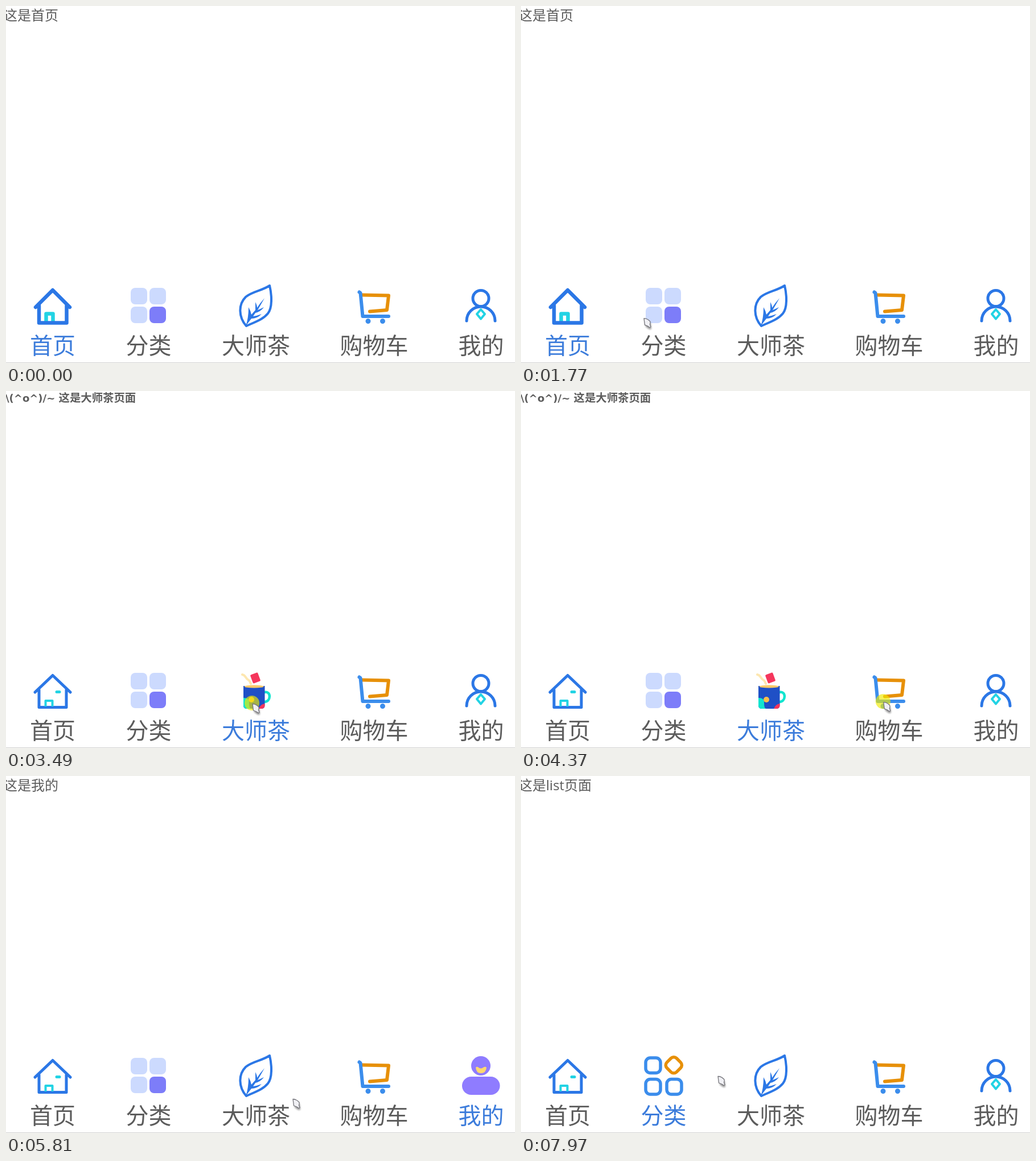
Animation, 894 px wide and 627 px high, one loop 8 s. Source, as an HTML page:

```html
<!DOCTYPE html>
<html lang="zh-CN">
<head>
<meta charset="utf-8">
<title>Tab bar</title>
<style>
  html, body { margin: 0; width: 100%; height: 100%; overflow: hidden; background: #fff; }
  svg { display: block; width: 894px; height: 627px; }
  text { font-family: "Open Sans", "Noto Sans CJK SC", "Noto Sans CJK", sans-serif; fill: #5c5c5c; }
  .label { font-size: 40px; text-anchor: middle; }
  .title { font-size: 24px; }
  .bold { font-weight: 700; font-size: 19.4px; }
  .bold .face { font-family: "DejaVu Sans", sans-serif; font-size: 18px; }
  .title, .on { visibility: hidden; }
  .title.show, .tab.active .on { visibility: visible; }
  .tab.active .off { visibility: hidden; }
  .tab.active .label { fill: #3c7cdb; }
  .line { fill: none; stroke-linecap: round; stroke-linejoin: round; }
  .blue { stroke: #2b77e6; }
  .sky { stroke: #3b8dec; }
  .orange { stroke: #e79008; }
  .cyan { stroke: #22d3e4; }
  .butt { stroke-linecap: butt; }
</style>
</head>
<body>
<svg viewBox="0 0 894 627">
  <defs>
    <rect id="tile" width="29" height="29" rx="8"/>
    <rect id="ring" width="26" height="26.5" rx="8"/>
  </defs>

  <text class="title" x="-4" y="24.5">这是首页</text>
  <text class="title" x="-4" y="24.5">这是list页面</text>
  <text class="title bold" y="19"><tspan class="face" x="-1">\(^o^)/~</tspan><tspan x="92.5">这是大师茶页面</tspan></text>
  <text class="title" x="-4" y="24.5">这是购物车</text>
  <text class="title" x="-4" y="24.5">这是我的</text>

  <g class="tab">
    <g class="off line" stroke-width="5">
      <path class="blue" d="M51 529L82 499.5L113 529M58 525V555.5H106V525"/>
      <path class="cyan butt" stroke-width="4" d="M69.5 554V544H81.5V554"/>
      <path class="cyan" d="M89 528.5H94"/>
    </g>
    <g class="on line" stroke-width="6.5">
      <path class="cyan butt" d="M70.5 554V540.5H82.5V554"/>
      <path class="blue" d="M52 529L82 499L112 529M58 526V556.5H106.5V526"/>
    </g>
    <text class="label" x="82" y="611">首页</text>
  </g>

  <g class="tab">
    <g class="off" fill="#ccdafe">
      <use href="#tile" x="219" y="495"/>
      <use href="#tile" x="252" y="495"/>
      <use href="#tile" x="219" y="528"/>
      <use href="#tile" x="252" y="528" fill="#7d7df9"/>
    </g>
    <g class="on line sky" stroke-width="5.5">
      <use href="#ring" x="219" y="495"/>
      <use href="#ring" x="219" y="532.5"/>
      <use href="#ring" x="256" y="532.5"/>
      <rect class="orange" x="-12" y="-12" width="24" height="24" rx="7" transform="translate(268.3 507.8) rotate(45)"/>
    </g>
    <text class="label" x="250.5" y="611">分类</text>
  </g>

  <g class="tab">
    <g class="off">
      <path class="line blue" stroke-width="4" d="M463 491C467 508 468 530 460 540C451 551 437 555 422 562C408 546 408 524 421 511C433 501 450 500 463 491Z"/>
      <path fill="#2b77e6" d="M421 562Q426 549 426 529Q430 536 431 542L438 534L438 520Q441 526 441 530Q446 522 454 513Q448 524 442 534Q447 532 453 529Q447 537 438 539L434 545Q441 544 449 541Q441 549 431 549Z"/>
    </g>
    <g class="on">
      <path class="line" stroke="#fde7b0" stroke-width="4" d="M415 498C421 499 421 505 425 507S428 511 430 514"/>
      <rect x="431" y="496" width="14" height="16" rx="2" fill="#f5365c" transform="rotate(-20 438 504)"/>
      <path class="line" stroke="#12e5cf" stroke-width="4.5" d="M454 529C466 526 466 547 453 546"/>
      <path fill="#1f50c6" d="M417 518H454.5V552Q454.5 558 448 558H423Q417 558 417 552Z"/>
      <path fill="#12e5cf" d="M417 539Q428 538 427 549Q427 558 431 558H423Q417 558 417 552Z"/>
      <path fill="#f5365c" d="M454.5 549V552Q454.5 558 448 558H444Q447 550 454.5 549Z"/>
      <circle cx="431" cy="542" r="5" fill="#fbbd4b"/>
      <ellipse cx="435.7" cy="519" rx="17" ry="2.5" fill="#fcc96a"/>
    </g>
    <text class="label" x="439" y="611">大师茶</text>
  </g>

  <g class="tab">
    <g class="line" stroke-width="6">
      <path class="orange" d="M625 507.5L672 508.5L669 534L639 536.5"/>
      <path class="sky" d="M620.5 502.5L622.5 504L626.5 545H672"/>
      <path class="sky" stroke-width="9" d="M636 553.5h0M661.5 553.5h0"/>
    </g>
    <text class="label" x="646.5" y="611">购物车</text>
  </g>

  <g class="tab">
    <g class="off line blue" stroke-width="5">
      <circle cx="834" cy="513.5" r="14"/>
      <path d="M809 553A25 25 0 0 1 859 553"/>
      <path class="cyan" stroke-width="4" d="M834 533L841 541L834 549.5L827 541Z"/>
    </g>
    <g class="on" fill="#8f7cff">
      <circle cx="834" cy="509" r="17"/>
      <rect x="801" y="528" width="66.5" height="32" rx="16"/>
      <path fill="#ffd86e" d="M825 512Q827 509.5 830 512Q834 515 838 512Q842 509.5 844 512Q843 522 834 522Q826 522 825 512Z"/>
    </g>
    <text class="label" x="834.5" y="611">我的</text>
  </g>

  <path d="M0 626.5H894" stroke="#cfcfcf"/>

  <g id="pointer">
    <circle id="glow" r="13" fill="#efe900" opacity=".65"/>
    <path d="M3 5L13 10L14 20Q11 22 8 19L4 16Z" opacity=".4" style="filter:blur(1.5px)"/>
    <path d="M1 1.5Q7 1.5 12 7Q12.5 10 11.5 12L13 16.5Q11 18.5 8.5 15.5L2.5 13Z" fill="#f0f0f4" stroke="#75757b" stroke-width="1.3" stroke-linejoin="round"/>
  </g>
</svg>
<script>
  const LOOP = 8000, STEP = 70, GLOW = 190;
  const HOME = 0, LIST = 1, TEA = 2, CART = 3, MINE = 4;

  // Pointer trips: leave, arrive, x, y and the tab pressed on arrival
  const trips = [
    [130, 130, 222, 571],
    [130, 340, 85, 558],
    [740, 1090, 126, 549],
    [1090, 1770, 222, 547],
    [1970, 2110, 231, 546, LIST],
    [2650, 3340, 432, 548, TEA],
    [3690, 4370, 652, 545, CART],
    [4510, 5390, 829, 533, MINE],
    [5460, 5810, 503, 566],
    [5810, 6370, 74, 550, HOME],
    [6440, 7340, 226, 538, LIST],
    [7550, 7970, 345, 526]
  ];
  const presses = trips.filter(trip => trip.length > 4);

  const tabs = document.querySelectorAll(".tab");
  const titles = document.querySelectorAll(".title");
  const pointer = document.getElementById("pointer");
  const glow = document.getElementById("glow");

  function pointerAt(t) {
    const i = trips.findLastIndex(([leave]) => leave <= t);
    const [leave, arrive, x, y] = trips[i];
    const [, , x0, y0] = trips[i - 1];
    const moved = Math.floor((t - leave) / STEP) * STEP;
    const k = Math.min(1, moved / (arrive - leave));
    return [x0 + (x - x0) * k, y0 + (y - y0) * k];
  }

  function draw(t) {
    const press = presses.findLast(([, at]) => at + STEP <= t);
    const page = press ? press[4] : HOME;
    tabs.forEach((tab, i) => tab.classList.toggle("active", i === page));
    titles.forEach((title, i) => title.classList.toggle("show", i === page));

    const visible = t >= trips[0][0];
    pointer.style.display = visible ? "" : "none";
    if (visible) pointer.setAttribute("transform", `translate(${pointerAt(t)})`);

    const pressed = presses.some(([, at]) => t >= at && t < at + GLOW);
    glow.style.display = pressed ? "" : "none";
  }

  const start = performance.now();
  function tick() {
    draw((performance.now() - start) % LOOP);
    requestAnimationFrame(tick);
  }
  tick();
</script>
</body>
</html>
```
